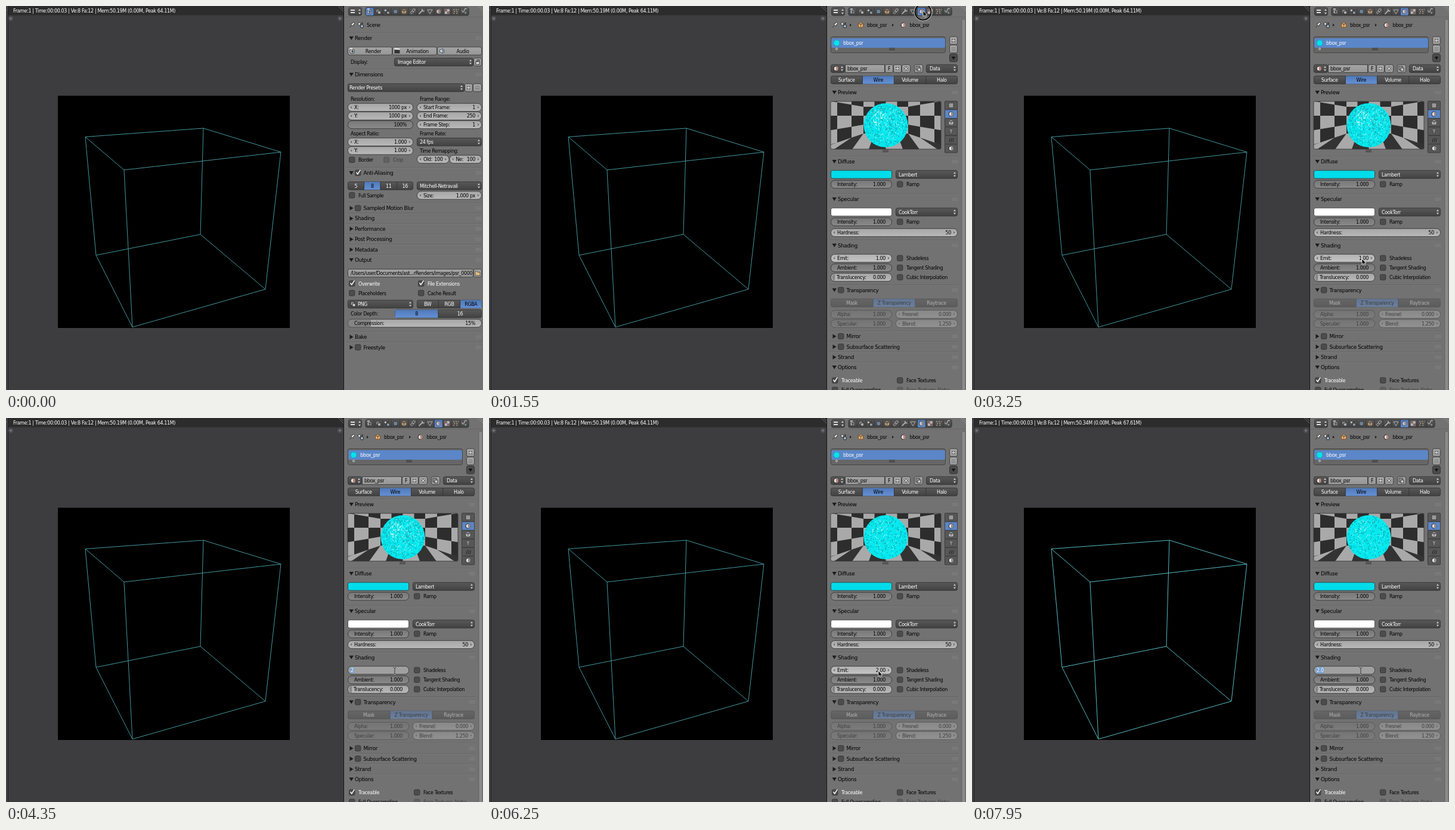
An HTML page that plays this animation: 800x644 px, repeating every 8 s.

```html
<!DOCTYPE html>
<html lang="en">
<head>
<meta charset="utf-8">
<title>Wire material settings</title>
<style>
  html, body { margin: 0; width: 100%; height: 100%; overflow: hidden; background: #3d3c3f; }
  svg { display: block; width: 800px; height: 644px; }
  text { font: 8px "DejaVu Sans", sans-serif; letter-spacing: -.37px; white-space: pre; }
  .title { font-size: 8.75px; }
  .dim { opacity: .45; }
  .muted { opacity: .75; filter: saturate(.6); }
  .grey { filter: grayscale(1); }
  .wire { fill: none; stroke-width: 1; }
  #pointer { animation: travel 8s infinite; }
  @keyframes travel {
    0%, 8.5% { transform: translate(802px, 34px); animation-timing-function: ease-out; }
    14.5%, 21.5% { transform: translate(728px, 8px); animation-timing-function: ease-in-out; }
    31%, 58% { transform: translate(654px, 424px); }
    62%, 100% { transform: translate(653px, 424px); }
  }
</style>
</head>
<body>
<svg id="stage" viewBox="0 0 800 644" xmlns="http://www.w3.org/2000/svg"></svg>
<script>
const LOOP = 8000;
const EDGE = '#303030', BLUE = '#5b86c8', CYAN = '#00e4ee';

// ---- basic shapes ----
const text = (x, y, s, fill = '#000', anchor = 'start', cls = '') =>
  `<text x="${x}" y="${y + 3}" fill="${fill}" text-anchor="${anchor}" class="${cls}">${s}</text>`;
const rect = (x, y, w, h, fill, r = 0, stroke = 'none') =>
  `<rect x="${x}" y="${y}" width="${w}" height="${h}" rx="${r}" fill="${fill}" stroke="${stroke}" stroke-width=".8"/>`;
const disc = (x, y, r, fill, stroke = 'none', w = 1) =>
  `<circle cx="${x}" cy="${y}" r="${r}" fill="${fill}" stroke="${stroke}" stroke-width="${w}"/>`;
const path = (d, stroke, fill = 'none', w = 1) =>
  `<path d="${d}" fill="${fill}" stroke="${stroke}" stroke-width="${w}"/>`;
const at = (x, y, s) => `<g transform="translate(${x} ${y})">${s}</g>`;
const styled = (cls, s) => `<g class="${cls}">${s}</g>`;
const dim = s => styled('dim', s);

// ---- widgets: x1..x2 wide, centred on y ----
const slab = (x1, x2, y, fill, r = 3, h = 13.4) =>
  rect(x1 + .4, y - h / 2, x2 - x1 - .8, h, fill, r, EDGE);

function field(x1, x2, y, label, value, fill = 'url(#light)', arrows = true) {
  const tips = arrows
    ? path(`M${x1 + 7} ${y - 2}l-2.5 2 2.5 2zM${x2 - 7} ${y - 2}l2.5 2-2.5 2z`, 'none', '#666') : '';
  return slab(x1, x2, y, fill, 6.5) + tips + text(x1 + 11, y, label) + text(x2 - 11, y, value, '#000', 'end');
}
const slider = (x1, x2, y, label, value) => field(x1, x2, y, label, value, 'url(#filled)', false);

function menu(x1, x2, y, label, pad = 6) {
  const x = x2 - 5;
  return slab(x1, x2, y, 'url(#dark)') + text(x1 + pad, y, label, '#fff') +
    path(`M${x - 2} ${y - 1.2}l2-3 2 3zM${x - 2} ${y + 1.2}l2 3 2-3z`, 'none', '#ccc');
}
const button = (x1, x2, y, label = '', fill = 'url(#tool)') =>
  slab(x1, x2, y, fill) + text((x1 + x2) / 2, y, label, '#000', 'middle');

function choice(x1, x2, y, labels, chosen) {
  const w = (x2 - x1) / labels.length;
  return slab(x1, x2, y, 'url(#dark)') + labels.map((s, i) => {
    const x = x1 + i * w, on = i === chosen;
    return (on ? rect(x + .4, y - 6.7, w - .8, 13.4, 'url(#blue)') : '') +
      (i ? path(`M${x} ${y - 6.5}v13`, EDGE, 'none', .8) : '') +
      text(x + w / 2, y, s, on ? '#000' : '#fff', 'middle');
  }).join('');
}
const tick = (x, y, on) => rect(x - 4.5, y - 4.8, 9.4, 9.4, '#4c4c4c', 2, EDGE) +
  (on ? path(`M${x - 2.5} ${y - 1}l2.3 3 4.5-7`, '#fff', 'none', 1.4) : '');
const check = (x, y, label, on = false) => tick(x, y, on) + text(x + 11, y, label, on ? '#fff' : '#000');

function panel(y, title, right, { open = false, box } = {}) {
  const arrow = open ? `M575.5 ${y - 3}h7.4l-3.7 6z` : `M576.5 ${y - 3.7}v7.4l6-3.7z`;
  let grip = '';
  for (let r = -1; r < 2; r++) grip += `M${right - 10} ${y + r * 2}h9`;
  return path(`M570 ${y - 9}H${right}`, '#646464') + path(`M570 ${y - 8}H${right}`, '#7a7a7a') +
    path(arrow, 'none', '#1c1c1c') + `<g stroke-dasharray="1 1">${path(grip, '#8c8c8c')}</g>` +
    (box === undefined ? '' : tick(590, y, box)) + text(box === undefined ? 585 : 599.5, y, title, '#000', 'start', 'title');
}
const symbol = d => path(d, '#333', 'none', 2.8) + path(d, '#e4e4e4', 'none', 1.3);
const plus = (x, y) => symbol(`M${x - 3} ${y}h6m-3-3v6`);
const minus = (x, y) => symbol(`M${x - 3} ${y}h6`);

// ---- small icons around (0,0) ----
const icon = {
  camera: rect(-4, -2.5, 7, 6, '#ddd', 1, '#222') + disc(0, .5, 2, '#456') + rect(-4, -5, 4, 2, '#eee'),
  layers: rect(-4, -4, 6, 6, '#999', 0, '#222') + rect(-1, -1, 5, 5, '#ccc', 0, '#222'),
  scene: disc(-2.5, -2, 2.2, '#e8e8e8', '#333') + disc(2, 2, 2.7, '#9db6d0', '#222') + disc(2.4, -3, 1.4, '#333'),
  world: disc(0, 0, 4, '#6d94bd', '#223'),
  cube: path('M0-4.5L4-2.5V2.5L0 4.5-4 2.5V-2.5zM-4-2.5L0-.5 4-2.5M0-.5V4.5', '#6b3d14', '#e6b070', .7),
  link: path('M-4 2l3-3 2 2-3 3zM-1-2l3-3 2.5 2-3 3.5z', '#ddd'),
  wrench: path('M-4 4L2-2M1-4l1 3 3 0', '#d0d0d0', 'none', 1.8),
  mesh: path('M-4-3h8l-4 7z', '#ccc'),
  ball: disc(0, 0, 4, '#e4dcda', '#222') + path('M0-4a4 4 0 0 1 0 8z', 'none', '#b5857c'),
  checker: rect(-4, -4, 8, 8, '#ddd') + path('M-4-4h4v8h4v-4h-8z', 'none', '#a66'),
  dots: path('M-4-3h2m2 0h2m2 0h1M-3 0h2m2 0h2M-4 3h2m3 0h2', '#d8c08a', 'none', 1.6),
  swing: path('M-4-2q2 6 4 0t4-2', '#ccc', 'none', 1.4) + disc(2, 2, 1.6, '#8ab'),
  pin: path('M-4 4l3-3M-2-2l4 4 1-3 2-2-2-2-2 2z', '#222', '#ddd', .8),
  film: rect(-4.5, -2, 9, 6, '#333') + path('M-4.5-4l9 1', '#eee', 'none', 2),
  speaker: path('M-4-1.5h2l3-3v9l-3-3h-2z', '#234', '#cfdce8', .7) + path('M3-3q2 3 0 6', '#357'),
  folder: path('M-4-3h3l1 1.5h4V4h-8z', '#333', '#dcbf83', .7),
  lock: rect(-3, -.5, 6, 4.5, '#ddd', 0, '#222') + path('M-1-.5v-3h4v2', '#222'),
  plane: rect(-4, -4, 8, 8, '#999', 0, '#333'),
  strands: path('M-3 4q0-5 3-7M0 4q0-5 3-7M3 4q0-4 2-6', '#222'),
  ape: path('M-4-2q4-4 8 0l-2 1-1 5h-2l-1-5z', '#333', '#888', .6)
};
const put = (name, x, y) => at(x, y, icon[name]);
const tabNames = ['camera', 'layers', 'scene', 'world', 'cube', 'link', 'wrench', 'mesh', 'ball', 'checker', 'dots', 'swing'];
const tabX = i => 610 + i * 14.42;
const tabLight = (id, i) => `<g id="${id}">${rect(tabX(i) - 7, 2.6, 14, 13.4, 'url(#blue)', 2, EDGE)}</g>`;

// ---- left side: render view ----
const status = (id, mem, peak) =>
  `<g id="${id}">${text(12, 8, `Frame:1 | Time:00:00.03 | Ve:8 Fa:12 | Mem:${mem}M (0.00M, Peak ${peak}M)`, '#fff')}</g>`;
const cubeLines = 'M133 219.5L331 205 461 245 198 275zM151 418L326 383 435 475 212 538.5z' +
  'M133 219.5L151 418M331 205L326 383M461 245L435 475M198 275L212 538.5';
const cube = (id, color) => `<path id="${id}" class="wire" stroke="${color}" d="${cubeLines}"/>`;
const corner = x => disc(x, 21, 4.5, '#4c4b4e') + path(`M${x - 2} 21h4m-2-2v4`, '#999', 'none', .8);

const view = rect(0, 0, 567, 644, '#3d3c3f') + rect(0, 0, 3, 644, '#434245') +
  rect(4, 0, 562, 15.5, '#2c2c2d') + path('M3.5 0V644', '#202021') +
  corner(8) + corner(560) + path('M557 0l9 9m-5-9l5 5M0 6l2 2', '#77777a', 'none', .8) +
  rect(87, 150.5, 389, 389.5, '#000') +
  status('statusA', '50.19', '64.11') + status('statusB', '50.34', '67.61') +
  cube('cubeA', '#43989f') + cube('cubeB', '#56bcc3');

const chrome = rect(567, 0, 233, 644, '#727272') + path('M566.5 0V644', '#151515') +
  path('M568 18.5H800', '#676767') + slab(574, 597, 9.3, 'url(#dark)') +
  path('M578 7h7m-7 4h7', '#ddd', 'none', 2) + path('M591 8l2-3 2 3zM591 11l2 3 2-3z', 'none', '#ccc') +
  rect(602.8, 2.6, 173.4, 13.4, 'url(#dark)', 3, EDGE) +
  tabNames.map((n, i) => i ? path(`M${tabX(i) - 7.2} 3v12.6`, EDGE, 'none', .7) : '').join('') +
  tabLight('tabA', 0) + tabLight('tabB', 8) +
  styled('muted', tabNames.map((n, i) => put(n, tabX(i), 9.3)).join('')) +
  path('M791 0l9 9m-5-9l5 5', '#999', 'none', .8) + put('pin', 580, 32) + put('scene', 595, 32);

// ---- render settings ----
const R = 798, open = { open: true };
const renderTab = text(605, 32, 'Scene') +
  panel(54, 'Render', R, open) +
  button(573, 648, 75.5) + button(648, 723, 75.5) + button(723, R, 75.5) +
  text(616, 75.5, 'Render', '#000', 'middle') + text(690, 75.5, 'Animation', '#000', 'middle') +
  text(766, 75.5, 'Audio', '#000', 'middle') +
  put('camera', 581, 75.5) + put('film', 656, 75.5) + put('speaker', 731, 75.5) +
  text(578, 94, 'Display:') + menu(651, 784, 94, 'Image Editor') + button(784, R, 94) + put('lock', 791, 94) +
  panel(115, 'Dimensions', R, open) +
  menu(573, 769, 137, 'Render Presets', 3) + button(769, 783, 137) + button(783, R, 137) + plus(776, 137) + minus(790.5, 137) +
  text(578, 156, 'Resolution:') + text(694, 156, 'Frame Range:') +
  field(573, 683, 170, 'X:', '1000 px') + field(573, 683, 184.4, 'Y:', '1000 px') + slider(573, 683, 199, '', '100%') +
  field(689, R, 170, 'Start Frame:', '1') + field(689, R, 184.4, 'End Frame:', '250') + field(689, R, 199, 'Frame Step:', '1') +
  text(578, 213.5, 'Aspect Ratio:') + text(694, 213.5, 'Frame Rate:') +
  field(573, 683, 228, 'X:', '1.000') + field(573, 683, 242.4, 'Y:', '1.000') +
  menu(689, R, 228, '24 fps', 5) + text(694, 242.5, 'Time Remapping:') +
  field(689, 743.5, 257, 'Old:', '100') + field(743.5, R, 257, 'Ne:', '100') +
  check(580, 258, 'Border') + dim(check(638, 258, 'Crop')) +
  panel(280, 'Anti-Aliasing', R, { open: true, box: true }) +
  choice(573, 683, 301.5, ['5', '8', '11', '16'], 1) + menu(689, R, 301.5, 'Mitchell-Netravali', 5) +
  check(580, 317.5, 'Full Sample') + field(689, R, 317.5, 'Size:', '1.000 px') +
  panel(339, 'Sampled Motion Blur', R, { box: false }) +
  ['Shading', 'Performance', 'Post Processing', 'Metadata'].map((s, i) => panel(356.4 + i * 17.4, s, R)).join('') +
  panel(426, 'Output', R, open) +
  slab(573, 784, 448, 'url(#tool)') + text(578, 448, '/Users/user/Documents/ast...rRenders/images/psr_0000') +
  button(784, R, 448) + put('folder', 791, 448) +
  check(580, 465.5, 'Overwrite', true) + check(696, 465.5, 'File Extensions', true) +
  check(580, 481.5, 'Placeholders') + check(696, 481.5, 'Cache Result') +
  menu(573, 683, 500, 'PNG', 17) + put('layers', 582, 500) + choice(689, R, 500, ['BW', 'RGB', 'RGBA'], 2) +
  text(578, 516, 'Color Depth:') + choice(652, R, 516, ['8', '16'], 0) +
  field(573, R, 532, '', '', 'url(#light)', false) + path('M612 525.7H580a6.3 6.3 0 0 0 0 12.6h32z', 'none', '#858585') +
  text(584, 532, 'Compression:') + text(787, 532, '15%', '#000', 'end') +
  panel(555, 'Bake', R) + panel(572.5, 'Freestyle', R, { box: false });

// ---- material preview ----
function room() {
  const cols = [573, 584, 608, 628, 646.5, 665.5, 684.5, 703, 723, 747, 758];
  const step = x => Math.max(15, 15 + (Math.abs(x - 665.5) - 37.5) * .17);
  let s = rect(573, 160, 185, 80, '#a9a9a9');
  for (let c = 0; c < 10; c++) {
    const a = cols[c], b = cols[c + 1], ha = step(a), hb = step(b);
    for (let k = -2; k < 2; k++) {
      if (!((c + k) & 1)) s += path(`M${a} ${184 + k * ha}L${b} ${184 + k * hb}V${184 + (k + 1) * hb}L${a} ${184 + (k + 1) * ha}z`, 'none', '#2d2d2d');
    }
    const fa = 665.5 + (a - 665.5) * 1.5, fb = 665.5 + (b - 665.5) * 1.5;
    if (!(c & 1)) s += path(`M${a} ${184 + 2 * ha}L${b} ${184 + 2 * hb}L${fb} 240H${fa}z`, 'none', '#333');
  }
  return `<g clip-path="url(#room)">${s}</g>` + rect(573, 160, 185, 80, 'none', 2, EDGE);
}
function ball(id, seed, darks, darkColor, pales) {
  const random = () => (seed = seed * 16807 % 2147483647) / 2147483647;
  const strokes = (n, cx, cy, radius, len) => {
    let d = '';
    for (let i = 0; i < n; i++) {
      const a = random() * 6.283, r = radius * Math.sqrt(random()), b = random() * 6.283;
      d += `M${(cx + r * Math.cos(a)).toFixed(1)} ${(cy + r * Math.sin(a)).toFixed(1)}l${(len * Math.cos(b)).toFixed(1)} ${(len * Math.sin(b)).toFixed(1)}`;
    }
    return d;
  };
  return `<g id="${id}">${disc(665.5, 200, 37, '#06e9ef') +
    path(strokes(darks, 665.5, 200, 36, 1.7), darkColor, 'none', 1) +
    path(strokes(pales, 665, 198, 31, 2.2), '#8df6f4', 'none', .9) +
    path(strokes(pales / 3, 656, 190, 14, 2), '#e0fffc', 'none', 1)}</g>`;
}

// ---- material settings ----
const M = 787;
const crumb = x => path(`M${x} 29.5l3 2.5-3 2.5z`, 'none', '#222');
const grip = (x, y) => path(`M${x - 5} ${y - 1}h10m-10 2.5h10`, '#222', 'none', .8);
const shade = (y, color, kind) => slab(573, 676, y, color) + menu(682, 786, y, kind, 5) +
  slider(573, 676, y + 16.5, 'Intensity:', '1.000') + check(689, y + 16.5, 'Ramp');
const previewKinds = ['plane', 'ball', 'cube', 'ape', 'strands', 'ball'];
const edit = (id, value, w) => `<g id="${id}">${slab(573, 676, 423, '#a0a0a0', 6.5) +
  rect(577.5, 418, w, 10, '#76a0d6') + text(578, 423, value, '#fff')}</g>`;
const emit = (id, value) => `<g id="${id}">${field(573, 676, 423, 'Emit:', value, 'url(#hover)')}</g>`;

const materialTab = rect(793, 22, 6, 640, '#8b8b8b', 3, '#5c5c5c') +
  crumb(605) + put('cube', 623.5, 32) + text(634, 32, 'bbox_psr') + crumb(676) + put('ball', 695, 32) + text(705.5, 32, 'bbox_psr') +
  rect(573.4, 51.5, 192, 27, '#666', 3, '#3c3c3c') + rect(574, 54, 191, 16, BLUE, 2) +
  disc(583, 62, 5, CYAN, '#19a8b4') + text(594, 62, 'bbox_psr', '#fff') + grip(676, 72) + disc(583, 72, 1.5, 'none', '#ccc') +
  button(772, 786, 58) + button(772, 786, 72) + button(772, 786, 87, '', '#4a4a4a') + plus(779, 58) + minus(779, 72) +
  path('M776 85h6l-3 5z', 'none', '#111') +
  menu(573, 597, 105, '') + put('ball', 582, 105) + slab(597, 664, 105, 'url(#tool)', 0) + text(601, 105, 'bbox_psr') +
  button(664, 678, 105, 'F') + button(678, 692, 105) + button(692, 707, 105) + plus(685, 105) +
  symbol('M696.5 102l6 6m0-6l-6 6') + button(713, 728, 105) + put('layers', 720, 105) + menu(733, 786, 105, 'Data') +
  choice(573, 786, 124, ['Surface', 'Wire', 'Volume', 'Halo'], 1) +
  panel(145, 'Preview', M, open) + room() + ball('ballA', 7, 420, '#1b9aa2', 150) + ball('ballB', 23, 230, '#0b8d94', 60) + grip(665, 243) +
  previewKinds.map((n, i) => rect(764.5, 159.6 + i * 14.4, 21, 14.4, i === 1 ? BLUE : '#575757', 1, EDGE) +
    styled('grey', put(n, 775, 166.8 + i * 14.4))).join('') +
  panel(261, 'Diffuse', M, open) + shade(282.5, '#00dcea', 'Lambert') +
  panel(324, 'Specular', M, open) + shade(345.5, '#fff', 'CookTorr') +
  field(573, 786, 380, 'Hardness:', '50') +
  panel(401.5, 'Shading', M, open) + emit('emitA', '1.00') + emit('emitB', '2.00') +
  edit('editA', '1.0', 13) + edit('editB', '2', 6) + edit('editC', '2.0', 13) +
  slider(573, 676, 439, 'Ambient:', '1.000') + field(573, 676, 455, '', '', 'url(#light)', false) +
  path('M580 449.2a6 6 0 0 0 0 11.6z', 'none', '#858585') + text(583, 455, 'Translucency:') + text(665, 455, '0.000', '#000', 'end') +
  ['Shadeless', 'Tangent Shading', 'Cubic Interpolation'].map((s, i) => check(689, 423 + i * 16, s)).join('') +
  panel(476.5, 'Transparency', M, { open: true, box: false }) +
  dim(choice(573, 786, 498, ['Mask', 'Z Transparency', 'Raytrace'], 1) +
    slider(573, 676, 517, 'Alpha:', '1.000') + slider(573, 676, 532.5, 'Specular:', '1.000') +
    field(682, 786, 517, 'Fresnel:', '0.000') + field(682, 786, 532.5, 'Blend:', '1.250')) +
  panel(554, 'Mirror', M, { box: false }) + panel(571.5, 'Subsurface Scattering', M, { box: false }) +
  panel(589, 'Strand', M) + panel(606, 'Options', M, open) +
  check(580, 628, 'Traceable', true) + check(689, 628, 'Face Textures') +
  check(580, 644, 'Full Oversampling') + dim(check(689, 644, 'Face Textures Alpha'));

// ---- pointers ----
const beamLines = 'M649.5 418.5h1.5l1 1 1-1h1.5M652 419v10m-2.5.5h1.5l1-1 1 1h1.5';
const pointers = `<g id="ring">${disc(728, 10, 15, 'none', '#eee') + disc(728, 10, 13.5, 'none', '#111', 2)}</g>` +
  `<g id="arrow"><g id="pointer">${path('M0 0V9.5L2.2 7.5 3.8 11 5.5 10.2 4 7H7z', '#fff', '#000', .8)}</g></g>` +
  `<g id="beam">${path(beamLines, '#ccc', 'none', 1.8) + path(beamLines, '#111')}</g>`;

const gradient = (id, top, bottom) =>
  `<linearGradient id="${id}" x2="0" y2="1"><stop stop-color="${top}"/><stop offset="1" stop-color="${bottom}"/></linearGradient>`;
const defs = `<defs>${gradient('light', '#a6a6a6', '#b9b9b9') + gradient('hover', '#b2b2b2', '#c4c4c4') +
  gradient('filled', '#787878', '#8a8a8a') + gradient('tool', '#a4a4a4', '#969696') +
  gradient('dark', '#585858', '#424242') + gradient('blue', '#5079b8', '#6490d4')}
  <clipPath id="room"><rect x="573" y="160" width="185" height="80" rx="2"/></clipPath></defs>`;

document.getElementById('stage').innerHTML = defs + view + chrome +
  `<g id="renderTab">${renderTab}</g><g id="materialTab">${materialTab}</g>` + pointers;

// ---- when each part is on screen (ms) ----
const SWITCH = 1450, EDIT = 3700, TYPE = 4250, ENTER = 4750, RENDER = 6300, EDIT2 = 7800;
const shown = {
  renderTab: [[0, SWITCH]], materialTab: [[SWITCH, LOOP]], tabA: [[0, SWITCH]], tabB: [[SWITCH, LOOP]],
  ring: [[1400, 1650]], arrow: [[700, EDIT], [ENTER, EDIT2]], beam: [[EDIT, ENTER], [EDIT2, LOOP]],
  emitA: [[SWITCH, EDIT]], editA: [[EDIT, TYPE]], editB: [[TYPE, ENTER]], emitB: [[ENTER, EDIT2]], editC: [[EDIT2, LOOP]],
  ballA: [[SWITCH, ENTER + 100]], ballB: [[ENTER + 100, LOOP]],
  statusA: [[0, RENDER]], statusB: [[RENDER, LOOP]], cubeA: [[0, RENDER]], cubeB: [[RENDER, LOOP]]
};
const style = document.createElement('style');
style.textContent = Object.entries(shown).map(([id, spans]) => {
  const key = (t, on) => `${t / LOOP * 100}% { opacity: ${on}; }`;
  const first = spans[0][0] > 0 ? key(0, 0) : '';
  const keys = spans.map(([a, b]) => key(a, 1) + (b < LOOP ? key(b, 0) : '')).join(' ');
  const last = key(LOOP, spans[spans.length - 1][1] === LOOP ? 1 : 0);
  return `#${id} { animation: show-${id} ${LOOP}ms step-end infinite; } @keyframes show-${id} { ${first} ${keys} ${last} }`;
}).join('\n');
document.head.append(style);
</script>
</body>
</html>
```
